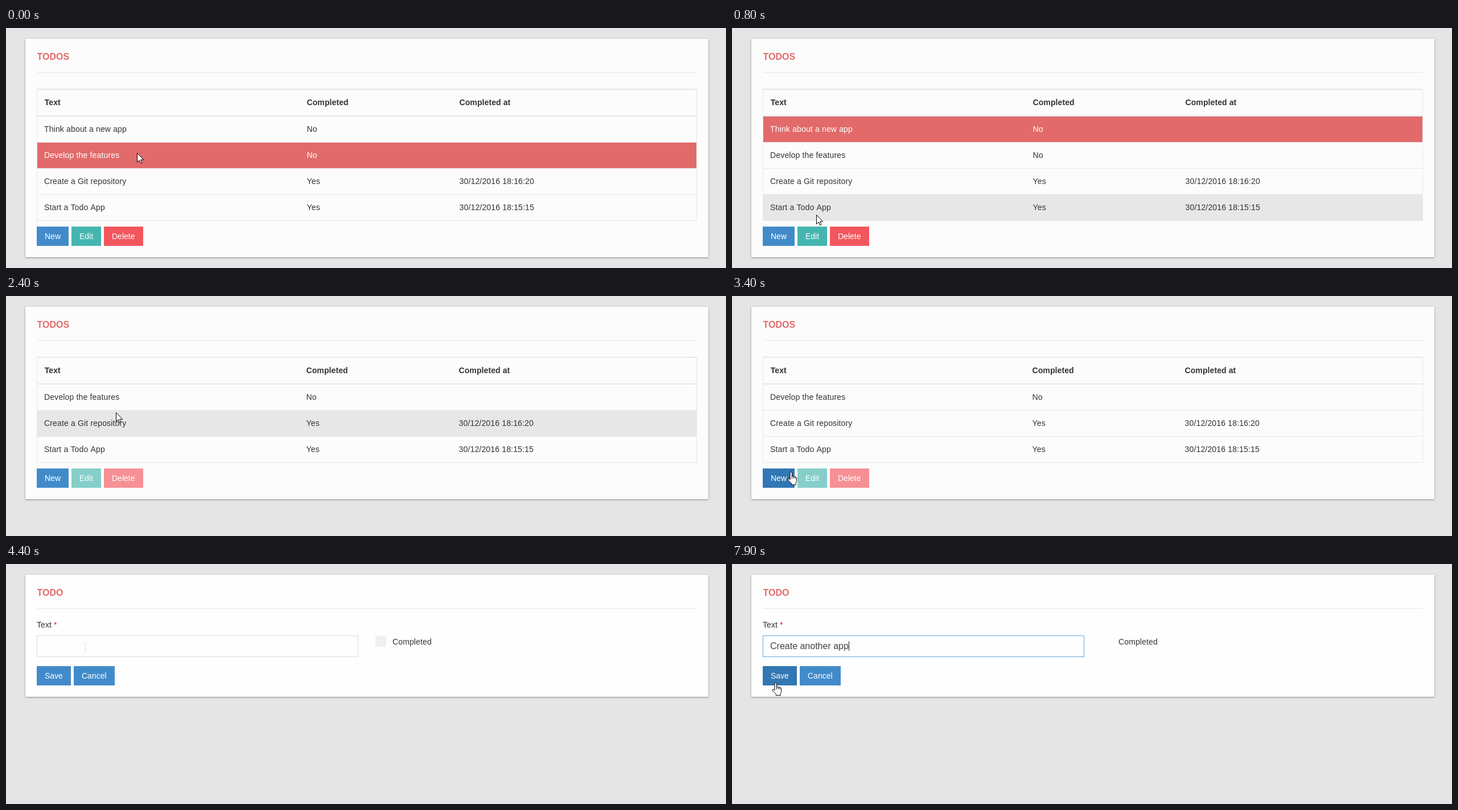
Write an HTML page with a canvas that moves like this. It is 1265x423 px and loops after 8000 ms.

```html
<!DOCTYPE html>
<html lang="en">
<head>
<meta charset="utf-8">
<title>Todos</title>
<style>
  html, body { margin: 0; width: 100%; height: 100%; overflow: hidden; background: #e5e5e5; }
  canvas { display: block; }
</style>
</head>
<body>
<canvas id="stage" width="1265" height="423"></canvas>
<script>
const ctx = document.getElementById('stage').getContext('2d');
const LOOP = 8000, STEP = 100;
const PAGE = '#e5e5e5', LINE = '#e7e7e7', INK = '#333', RED = '#e26a6a', BLUE = '#428bca', BLUE_HOVER = '#3277b3';
const TYPED = 'Create another app';

const TODOS = [
  ['Think about a new app', 'No', ''],
  ['Develop the features', 'No', ''],
  ['Create a Git repository', 'Yes', '30/12/2016 18:16:20'],
  ['Start a Todo App', 'Yes', '30/12/2016 18:15:15'],
];

// Pointer path: time, x, y
const PATH = [
  [0, 230, 220], [100, 230, 220], [300, 212, 178], [400, 212, 178], [800, 148, 329],
  [1000, 146, 362], [1300, 203, 366], [1900, 203, 365], [2000, 197, 203], [2100, 197, 203],
  [2200, 194, 180], [2400, 193, 205], [3000, 110, 300], [3100, 104, 310], [3600, 103, 310],
  [3700, 103, 310], [3900, 103, 284], [4400, 139, 147], [7000, 139, 147], [7400, 37, 247],
  [7500, 37, 247], [7900, 76, 209], [8000, 76, 209],
];

const ARROW = new Path2D('M.5 .5V16.5L4.2 13 6.6 18.6 9 17.6 6.6 12.2H11.6Z');
const HAND = new Path2D('M5 14V2.2a1.7 1.7 0 0 1 3.4 0V8q1.5-1 3 .4 1.7-.6 2.7 .7 2.3-.3 2.4 2V16q0 2-1.5 4V23H7.5V21Q5 18 1 14.2q0-2.5 2-2 1 .3 2 1.8Z');
const FINGERS = new Path2D('M8.4 8v4M11.4 8.4v3.6M14.1 9.1v3');

const clamp = v => Math.max(0, Math.min(1, v));
const inside = (p, x, y, w, h) => p.x >= x && p.x < x + w && p.y >= y && p.y < y + h;

function pointerAt(t) {
  const i = PATH.findIndex(k => k[0] > t);
  const [t0, x0, y0] = PATH[i - 1], [t1, x1, y1] = PATH[i];
  const f = (t - t0) / (t1 - t0);
  return { x: Math.round(x0 + (x1 - x0) * f), y: Math.round(y0 + (y1 - y0) * f), kind: 'arrow' };
}

function rect(x, y, w, h, color) {
  ctx.fillStyle = color;
  ctx.fillRect(x, y, w, h);
}

function text(str, x, y, color = INK, { size = 14, bold = false, spacing = 0 } = {}) {
  ctx.font = `${bold ? 'bold ' : ''}${size}px "Liberation Sans", Arial, sans-serif`;
  ctx.letterSpacing = spacing + 'px';
  ctx.fillStyle = color;
  ctx.fillText(str, x, y);
}

function card(title, height, color) {
  ctx.save();
  ctx.shadowColor = 'rgba(0,0,0,.4)';
  ctx.shadowBlur = 3;
  ctx.shadowOffsetY = 1;
  rect(34, 19, 1200, height, color);
  ctx.restore();
  text(title, 54.5, 56, RED, { size: 16, bold: true });
  rect(54, 78, 1160, 1, LINE);
}

function button(label, x, y, w, color, hoverColor, pointer, alpha = 1) {
  const hover = alpha === 1 && inside(pointer, x, y, w, 34);
  if (hover) pointer.kind = 'hand';
  ctx.globalAlpha = alpha;
  rect(x, y, w, 34, hover ? hoverColor : color);
  ctx.globalAlpha = 1;
  text(label, x + 14, y + 22, '#fff');
}

function drawList(t, pointer) {
  const deleted = t >= 1500;
  const rows = deleted ? TODOS.slice(1) : TODOS;
  const selected = t < 500 ? 1 : deleted ? -1 : 0;
  const shift = deleted ? 1 : 0;
  const columns = [67, 528.5 - shift, 796.5 - shift];
  const bottom = 156 + rows.length * 46;

  card('TODOS', bottom + 45, '#fcfcfc');
  rect(54, 107, 1160, 2, LINE);
  rect(54, 154, 1160, 2, LINE);
  rect(54, 107, 1, bottom - 107, LINE);
  rect(1213, 107, 1, bottom - 107, LINE);
  ['Text', 'Completed', 'Completed at'].forEach((label, c) =>
    text(label, columns[c] + (c ? 0 : 0.7), 136, INK, { bold: true, spacing: 0.1 }));

  rows.forEach((row, i) => {
    const y = 156 + i * 46;
    if (i === selected) rect(55, y, 1158, 45, RED);
    else if (inside(pointer, 55, y, 1158, 45)) rect(55, y, 1158, 45, LINE);
    rect(54, y + 45, 1160, 1, LINE);
    row.forEach((cell, c) =>
      text(cell, columns[c], y + 27, i === selected ? '#fff' : INK, { spacing: 0.16 }));
  });

  const alpha = 1 - 0.35 * clamp((t - 1500) / 300);
  const y = bottom + 10;
  button('New', 54, y, 56, BLUE, BLUE_HOVER, pointer);
  button('Edit', 115, y, 52, '#45b6af', '#3a9c96', pointer, alpha);
  button('Delete', 172, y, 69, '#f3565d', '#ef3038', pointer, alpha);
}

function typedCount(t) {
  if (t < 5500) return 0;
  if (t < 5700) return 1;
  if (t <= 6500) return (t - 5500) / 100;
  return Math.min(TYPED.length, 10 + Math.ceil((t - 6500) * 8 / 500));
}

function drawForm(t, pointer) {
  const shown = 1 - (1 - clamp((t - 3500) / 400)) ** 2;
  ctx.save();
  ctx.translate(0, Math.round(16 * (1 - shown)));
  card('TODO', 215, '#fefefe');
  text('Text', 54, 112, INK, { spacing: 0.1 });
  text('*', 84, 112, '#e02222');

  ctx.strokeStyle = t < 4700 ? '#dbdbdb' : t < 4800 ? '#a0c6e0' : '#62aadf';
  ctx.lineWidth = 1;
  ctx.strokeRect(54.5, 126.5, 564, 37);
  const value = TYPED.slice(0, typedCount(t));
  text(value, 67, 150, '#444', { size: 16 });
  const caretOff = t < 4700 || (t >= 5100 && t < 5500) || (t >= 7600 && t < 7900);
  if (!caretOff) rect(67 + Math.round(ctx.measureText(value).width), 136, 1, 17, '#222');

  if (t < 7400) rect(649, 127, 19, 19, '#f0f0f0');
  text('Completed', 679, 142, INK, { spacing: 0.13 });
  button('Save', 54, 180, 60, BLUE, BLUE_HOVER, pointer);
  button('Cancel', 119, 180, 72, BLUE, BLUE_HOVER, pointer);
  ctx.restore();

  ctx.globalAlpha = 1 - shown;
  rect(0, 0, 1265, 423, PAGE);
  ctx.globalAlpha = 1;
  if (inside(pointer, 54, 126, 565, 38)) pointer.kind = 'beam';
}

function drawPointer({ x, y, kind }) {
  ctx.save();
  ctx.translate(x, y);
  if (kind === 'beam') {
    rect(0, -7, 1, 14, '#e2e2e2');
    rect(-3, -8, 7, 1, '#ececec');
    rect(-3, 7, 7, 1, '#ececec');
  } else {
    const shape = kind === 'hand' ? HAND : ARROW;
    if (kind === 'hand') ctx.translate(-6, -0.3);
    ctx.fillStyle = '#fff';
    ctx.strokeStyle = '#000';
    ctx.lineWidth = 1;
    ctx.lineJoin = 'round';
    ctx.fill(shape);
    ctx.stroke(shape);
    if (kind === 'hand') ctx.stroke(FINGERS);
  }
  ctx.restore();
}

function draw(now) {
  const t = Math.floor((now % LOOP) / STEP) * STEP;
  const pointer = pointerAt(t);
  rect(0, 0, 1265, 423, PAGE);
  (t < 3600 ? drawList : drawForm)(t, pointer);
  drawPointer(pointer);
}

const start = performance.now();
function tick() {
  draw(performance.now() - start);
  requestAnimationFrame(tick);
}
tick();
</script>
</body>
</html>
```
